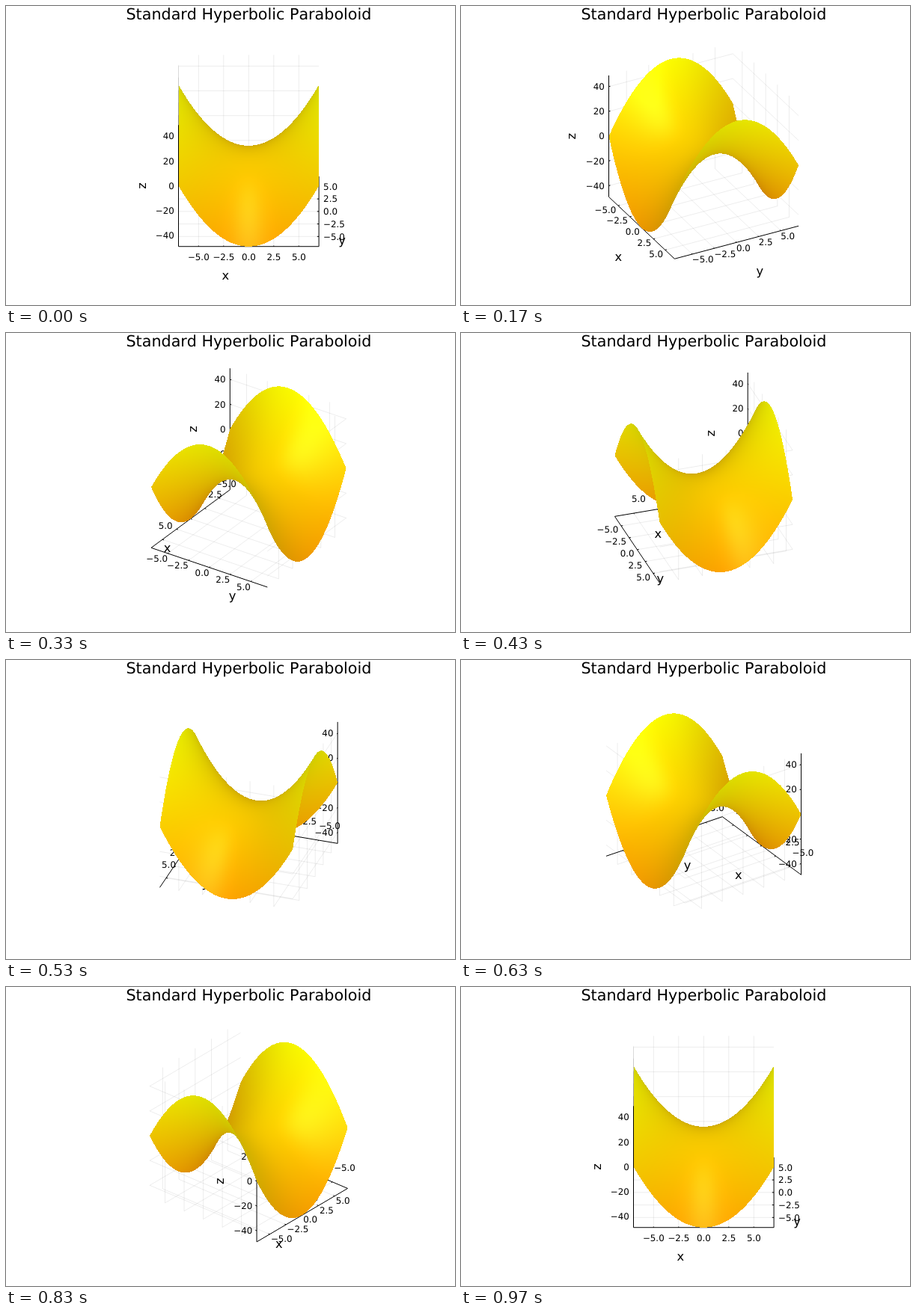
Write an HTML page with a canvas that moves like this. It is 600 px wide and 400 px high and loops after 1010 ms.

```html
<!DOCTYPE html>
<html lang="en">
<head>
<meta charset="utf-8">
<title>Standard Hyperbolic Paraboloid</title>
<style>
  html, body { margin: 0; width: 100%; height: 100%; overflow: hidden; background: #fff; }
  svg, canvas { position: absolute; left: 0; top: 0; width: 600px; height: 400px; }
  text { font-family: "DejaVu Sans", Verdana, sans-serif; font-kerning: none; text-rendering: geometricPrecision; }
  .tick { font-size: 11.85px; }
  .name { font-size: 16.3px; text-anchor: middle; }
  .title { font-size: 20.7px; text-anchor: middle; }
  path { fill: none; stroke: #000; }
</style>
</head>
<body>
<svg viewBox="0 0 600 400">
  <path id="grid" stroke-opacity="0.075"/>
  <path id="axes"/>
  <g id="labels"></g>
  <text class="title" x="324.4" y="18.3">Standard Hyperbolic Paraboloid</text>
</svg>
<canvas id="surface" width="600" height="400"></canvas>
<script>
const LOOP = 1010, STEPS = 30;
const CX = 324.3, CY = 193.6, R = 93.8;            // centre and half size of the unit cube
const SIN_E = 0.5, COS_E = Math.sqrt(3) / 2;       // camera elevation 30 degrees
const TICK = 0.025;
const AMBIENT = 0.8, DIFFUSE = 0.2, SPECULAR = 25, SHINE = 10;

const byId = id => document.getElementById(id);
const ctx = byId("surface").getContext("2d");
const BOX = { x: 180, y: 40, w: 290, h: 300 };
const image = ctx.createImageData(BOX.w, BOX.h);

function addText(cls, str) {
  const el = document.createElementNS("http://www.w3.org/2000/svg", "text");
  el.setAttribute("class", cls);
  el.textContent = str;
  byId("labels").append(el);
  return el;
}

const place = (el, x, y, anchor) => {
  el.setAttribute("x", x.toFixed(2));
  el.setAttribute("y", y.toFixed(2));
  if (anchor) el.setAttribute("text-anchor", anchor);
};

const makeTicks = (values, max, digits) => values.map(v => ({
  at: v / max,
  el: addText("tick", v.toFixed(digits).replace("-", "\u2212"))
}));

const flat = [-5, -2.5, 0, 2.5, 5];
const ticks = {
  x: makeTicks(flat, 7, 1),
  y: makeTicks(flat, 7, 1),
  z: makeTicks([-40, -20, 0, 20, 40], 49, 0)
};
const names = { x: addText("name", "x"), y: addText("name", "y"), z: addText("name", "z") };

// Where a tick label sits, given the outward screen direction of its axis
function labelOffset(ox, oy) {
  const eps = 1e-6;
  if (oy < -eps) return [5 * ox - 1.2, -17.3 + 2.6 * oy, "start"];
  if (Math.abs(ox) < eps) return [0, 14, "middle"];
  const side = Math.sign(ox);
  const drop = oy < eps ? 0 : 5 - 2 * oy + 5 * oy * oy;
  return [side * (6 - 7 * oy), drop, side > 0 ? "start" : "end"];
}

function drawFrame(cos, sin) {
  const project = (x, y, z) => [
    CX + R * (x * cos + y * sin),
    CY + R * (SIN_E * (x * sin - y * cos) - COS_E * z)
  ];
  const line = (...pts) => "M" + pts.map(p => project(...p).map(n => n.toFixed(2)).join(" ")).join("L");

  let grid = "";
  let axes = line([-1, -1, -1], [1, -1, -1]) + line([1, -1, -1], [1, 1, -1]) + line([-1, -1, -1], [-1, -1, 1]);

  const xOff = labelOffset(-sin, cos), yOff = labelOffset(cos, sin);
  const setTick = (el, p, [dx, dy, anchor]) => place(el, p[0] + dx, p[1] + dy + 4.3, anchor);

  for (const { at, el } of ticks.x) {
    grid += line([at, -1, -1], [at, 1, -1], [at, 1, 1]);
    axes += line([at, -1, -1], [at, -1 + TICK, -1]);
    setTick(el, project(at, -1, -1), xOff);
  }
  for (const { at, el } of ticks.y) {
    grid += line([1, at, -1], [-1, at, -1], [-1, at, 1]);
    axes += line([1, at, -1], [1 - TICK, at, -1]);
    setTick(el, project(1, at, -1), yOff);
  }
  for (const { at, el } of ticks.z) {
    grid += line([-1, -1, at], [-1, 1, at], [1, 1, at]);
    axes += line([-1, -1, at], [-1, -1 + TICK, at]);
    setTick(el, project(-1, -1, at), [-5.7, 0, "end"]);
  }
  byId("grid").setAttribute("d", grid);
  byId("axes").setAttribute("d", axes);

  const mx = project(0, -1, -1), my = project(1, 0, -1), mz = project(-1, -1, 0);
  place(names.x, mx[0] - 31, mx[1] + 44);
  place(names.y, my[0] + 31, my[1] + 43.7);
  names.z.setAttribute("transform", `translate(${mz[0] - 44} ${mz[1]}) rotate(-90)`);
}

// Casts one parallel ray per pixel onto z = x² - y²
function drawSurface(cos, sin) {
  const cx = sin * COS_E, cy = -cos * COS_E, cz = SIN_E;
  const A = cy * cy - cx * cx;
  const data = image.data;
  data.fill(0);
  for (let j = 0, i = 0; j < BOX.h; j++) {
    const b = (CY - BOX.y - j - 0.5) / R;
    for (let k = 0; k < BOX.w; k++, i += 4) {
      const a = (BOX.x + k + 0.5 - CX) / R;
      const px = a * cos - b * sin * SIN_E;
      const py = a * sin + b * cos * SIN_E;
      const pz = b * COS_E;
      const B = cz + 2 * (py * cy - px * cx);
      const C = pz - px * px + py * py;
      const disc = B * B - 4 * A * C;
      if (disc < 0) continue;
      const q = -(B + (B < 0 ? -1 : 1) * Math.sqrt(disc)) / 2;
      const s1 = q / A, s2 = C / q;
      for (const s of [Math.max(s1, s2), Math.min(s1, s2)]) {
        const x = px + s * cx, y = py + s * cy;
        if (!(Math.abs(x) <= 1 && Math.abs(y) <= 1)) continue;
        const facing = Math.abs(-2 * x * cx + 2 * y * cy + cz) / Math.sqrt(4 * x * x + 4 * y * y + 1);
        const light = AMBIENT + DIFFUSE * facing;
        const shine = SPECULAR * Math.max(0, 2 * facing * facing - 1) ** SHINE;
        const height = (x * x - y * y + 1) / 2;
        data[i] = 255 * light + shine;
        data[i + 1] = (165 + 90 * height) * light + shine;
        data[i + 2] = shine;
        data[i + 3] = 255;
        break;
      }
    }
  }
  ctx.putImageData(image, BOX.x, BOX.y);
}

const stepStart = k => Math.round(k * 10 / 3) * 10;
let shown = -1;

function render(now) {
  const t = now % LOOP;
  let k = STEPS - 1;
  while (k > 0 && stepStart(k) > t) k--;
  if (k !== shown) {
    shown = k;
    const angle = (k % (STEPS - 1)) / (STEPS - 1) * 2 * Math.PI;
    const cos = Math.cos(angle), sin = Math.sin(angle);
    drawFrame(cos, sin);
    drawSurface(cos, sin);
  }
}

let origin = null;
function tick(now) {
  if (origin === null) origin = now;
  render(Math.max(0, now - origin));
  requestAnimationFrame(tick);
}
render(0);
requestAnimationFrame(tick);
</script>
</body>
</html>
```
